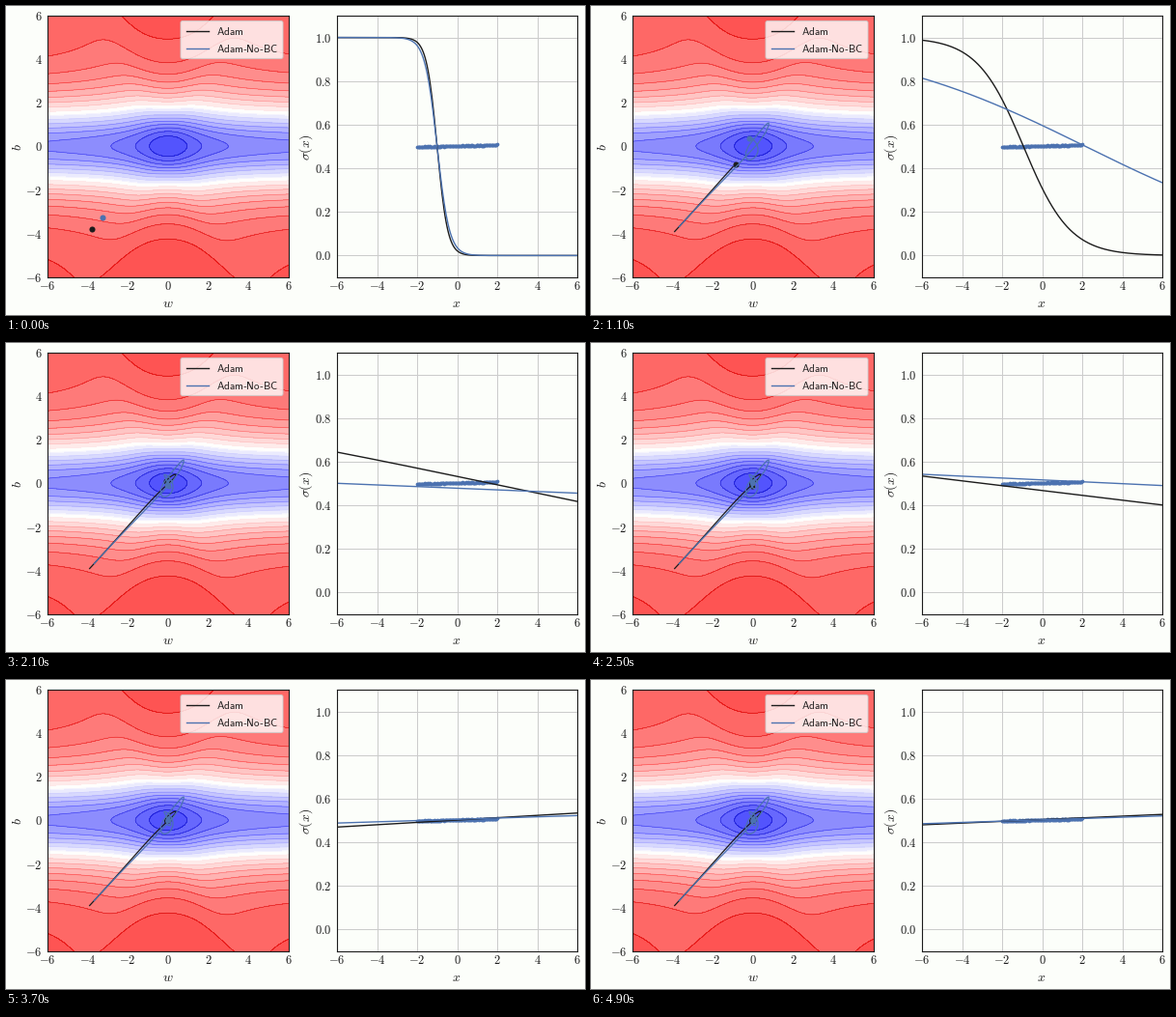
A matplotlib script that plays this animation: 600 px wide and 320 px high, repeating every 5000 ms.

```python
import numpy as np
import matplotlib.pyplot as plt
from matplotlib.animation import FuncAnimation
from matplotlib.patches import FancyBboxPatch

WIDTH, HEIGHT, DPI = 600, 320, 100
FRAMES, INTERVAL = 50, 100
STEPS_PER_FRAME = 2.5
PAPER, INK, BLUE = "#fcfefa", "#1c1c1c", "#4c72b0"

plt.rcParams.update({
    "mathtext.fontset": "cm",
    "font.family": "Liberation Sans",
    "axes.linewidth": 0.8,
    "axes.edgecolor": INK,
})

# Training set: a few spread inputs plus a heavy cluster at zero.
SPREAD_SHARE = 0.24
spread = np.linspace(-2, 2, 81)
inputs = np.append(spread, 0)
weights = np.append(np.full(spread.size, SPREAD_SHARE / spread.size),
                    1 - SPREAD_SHARE)
targets = 0.5035 + 0.0027 * inputs


def sigmoid(z):
    return 1 / (1 + np.exp(-z))


def loss(w, b):
    pred = sigmoid(w[..., None] * inputs + b[..., None])
    return ((pred - targets) ** 2) @ weights


def gradient(params):
    pred = sigmoid(params[0] * inputs + params[1])
    slope = weights * (pred - targets) * pred * (1 - pred)
    return np.array([slope @ inputs, slope.sum()])


def run_adam(steps, bias_correction, rate=0.1, beta1=0.9, beta2=0.999):
    params = np.array([-4.0, -4.0])
    m, v = np.zeros(2), np.zeros(2)
    path = []
    for t in range(1, steps + 1):
        g = gradient(params)
        m = beta1 * m + (1 - beta1) * g
        v = beta2 * v + (1 - beta2) * g ** 2
        m_hat, v_hat = m, v
        if bias_correction:
            m_hat, v_hat = m / (1 - beta1 ** t), v / (1 - beta2 ** t)
        params = params - rate * m_hat / (np.sqrt(v_hat) + 1e-8)
        path.append(params)
    return np.array(path)


def pixel_axes(left, top, width, height):
    return fig.add_axes([left / WIDTH, 1 - (top + height) / HEIGHT,
                         width / WIDTH, height / HEIGHT], facecolor=PAPER)


def style_axes(ax, yticks, ylim, digits):
    xticks = range(-6, 7, 2)
    ax.set_xlim(-6, 6)
    ax.set_ylim(*ylim)
    ax.set_xticks(xticks, [f"${x}$" for x in xticks])
    ax.set_yticks(yticks, [f"${y:.{digits}f}$" for y in yticks])
    ax.tick_params(length=0, pad=4, labelsize=9, labelcolor=INK)
    ax.tick_params(axis="x", pad=2.5)


def label(x, y, text, size=10, **style):
    style = {"ha": "center", "va": "center", **style}
    fig.text(x / WIDTH, 1 - y / HEIGHT, text, fontsize=size, color=INK, **style)


fig = plt.figure(figsize=(WIDTH / DPI, HEIGHT / DPI), dpi=DPI, facecolor=PAPER)

# Loss surface
surface = pixel_axes(43, 10, 249.5, 271)
style_axes(surface, range(-6, 7, 2), (-6, 6), 0)
grid_w, grid_b = np.meshgrid(np.linspace(-6, 6, 121), np.linspace(-6, 6, 121))
heights = loss(grid_w, grid_b)
levels = np.arange(20) * 0.0133
surface.contourf(grid_w, grid_b, heights, levels, cmap="bwr", alpha=0.7)
surface.contour(grid_w, grid_b, heights, levels, cmap="seismic",
                linewidths=0.5, alpha=0.4)

# Fitted curves
fit = pixel_axes(343, 10, 249, 271)
style_axes(fit, np.linspace(0, 1, 6), (-0.1, 1.1), 1)
fit.set_axisbelow(True)
fit.grid(color="#cccccc", linewidth=0.75)
rng = np.random.default_rng(4)
dots_x = np.linspace(-2, 2, 110)
dots_y = 0.5025 + 0.0025 * dots_x + rng.normal(0, 0.0012, dots_x.size)
fit.plot(dots_x, dots_y, "o", color=BLUE, markersize=2.7,
         markeredgewidth=0, zorder=1.5)

label(168, 308, "$w$")
label(467, 308, "$x$")
label(12, 146, "$b$", rotation=90)
label(311, 146, r"$\sigma(x)$", rotation=90)

# Legend
px, py = 1 / WIDTH, 1 / HEIGHT
fig.add_artist(FancyBboxPatch(
    (183 * px, 1 - 52.5 * py), 102 * px, 35 * py,
    boxstyle=f"round,pad={2 * px}", mutation_aspect=WIDTH / HEIGHT,
    facecolor=(1, 1, 1, 0.8), edgecolor=(0.8, 0.8, 0.8, 0.8), linewidth=0.8))
entries = [(26, INK, r"$\mathsf{Adam}$"),
           (43.5, BLUE, r"$\mathsf{Adam}$-$\mathsf{No}$-$\mathsf{BC}$")]
for y, color, name in entries:
    fig.add_artist(plt.Line2D([187 * px, 210 * px], [1 - y * py] * 2,
                              color=color, linewidth=1))
    label(218, y + 4, name, 8, ha="left", va="baseline")

curve_x = np.linspace(-6, 6, 241)
last_step = 2 + int(STEPS_PER_FRAME * (FRAMES - 1))
runs = []
for color, corrected in [(INK, True), (BLUE, False)]:
    path = run_adam(last_step, corrected)
    trail, = surface.plot([], [], color=color, linewidth=0.9)
    head, = surface.plot([], [], "o", color=color, markersize=4.4,
                         markeredgewidth=0)
    curve, = fit.plot([], [], color=color, linewidth=1)
    runs.append((path, trail, head, curve))


def draw(frame):
    step = 2 + int(STEPS_PER_FRAME * frame)
    artists = []
    for path, trail, head, curve in runs:
        w, b = path[step - 1]
        trail.set_data(path[:step - 1, 0], path[:step - 1, 1])
        head.set_data([w], [b])
        curve.set_data(curve_x, sigmoid(w * curve_x + b))
        artists += [trail, head, curve]
    return artists


animation = FuncAnimation(fig, draw, frames=FRAMES, interval=INTERVAL,
                          repeat=True, repeat_delay=0, blit=False)
plt.show()
```
